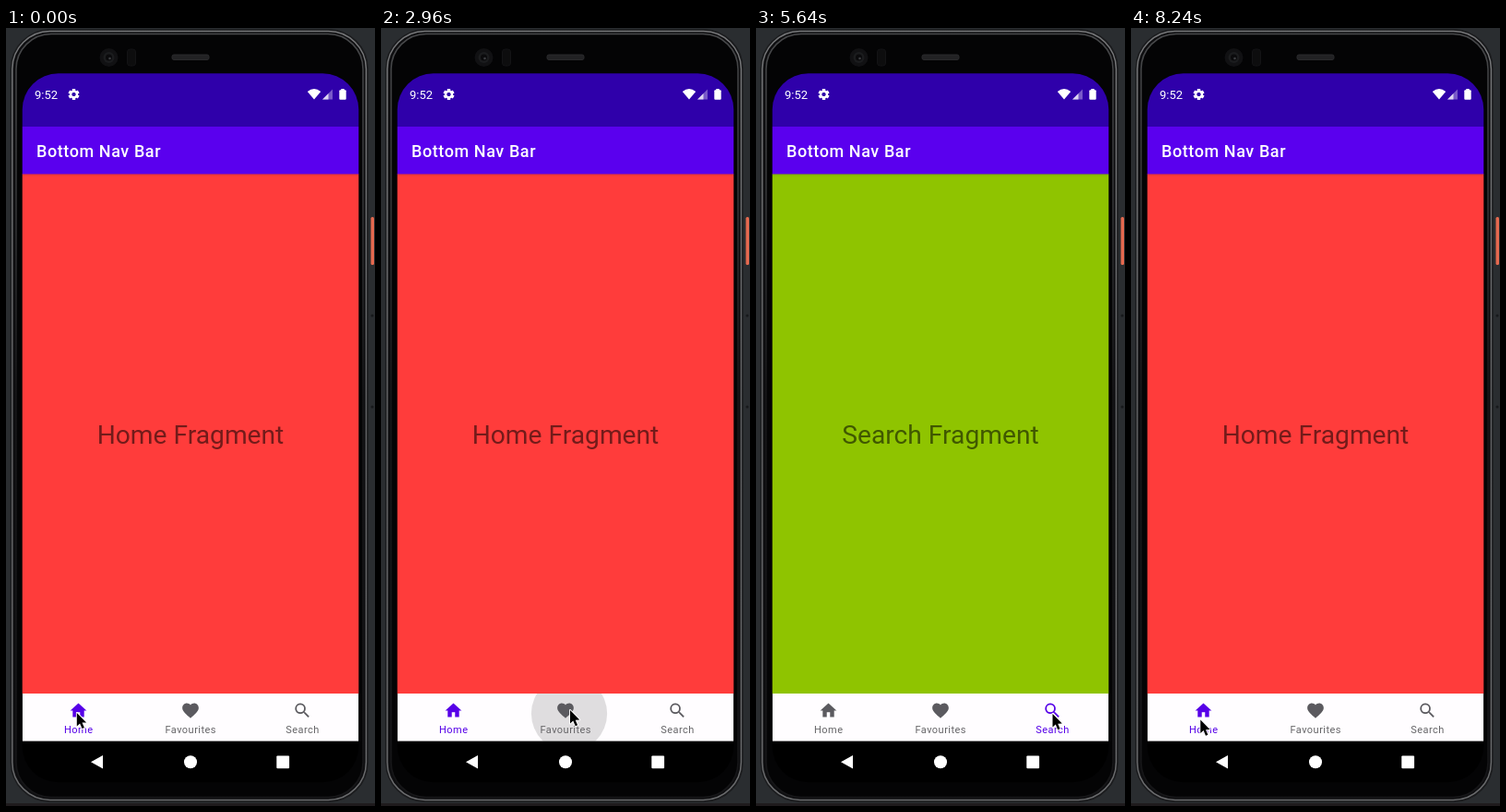
These frames come from a looping animation (400x844 px, 8.28 s). An HTML page with a canvas:

```html
<!DOCTYPE html>
<html lang="en">
<head>
<meta charset="utf-8">
<title>Bottom navigation</title>
<style>
  html, body { margin: 0; width: 100%; height: 100%; overflow: hidden; background: #2a2d30; }
  canvas { display: block; width: 400px; height: 844px; }
</style>
</head>
<body>
<canvas id="stage"></canvas>
<script>
const W = 400, H = 844, LOOP = 8280;
const canvas = document.getElementById('stage');
const ctx = canvas.getContext('2d');
const dpr = window.devicePixelRatio || 1;
canvas.width = W * dpr;
canvas.height = H * dpr;

const ACCENT = '#5600e8', MUTED = '#5b5a5f';
const FONT = 'Roboto, "Noto Sans", sans-serif';
const NAV = { x: 17.7, y: 722, w: 364.6, h: 51.6 };

const items = [
  { label: 'Home', x: 78.5, color: '#ff3c3b',
    icon: 'M10 20v-6h4v6h5v-8h3L12 3 2 12h3v8z' },
  { label: 'Favourites', x: 200, color: '#2da9e1',
    icon: 'M12 21.35l-1.45-1.32C5.4 15.36 2 12.28 2 8.5 2 5.42 4.42 3 7.5 3c1.74 0 3.41.81 4.5 2.09C13.09 3.81 14.76 3 16.5 3 19.58 3 22 5.42 22 8.5c0 3.78-3.4 6.86-8.55 11.54z' },
  { label: 'Search', x: 321.3, color: '#8fc400',
    icon: 'M15.5 14h-.79l-.28-.27A6.5 6.5 0 1 0 13.73 14.43l.27.28v.79l5 4.99L20.49 19zM9.5 14a4.5 4.5 0 1 1 0-9 4.5 4.5 0 0 1 0 9z' }
];
for (const it of items) it.path = new Path2D(it.icon);

const switches = [[0, 0], [3000, 1], [5120, 2], [7080, 0]];
const taps = [
  { t: 930, item: 0, x: 76, y: 743 },
  { t: 2863, item: 1, x: 204.8, y: 743 },
  { t: 4965, item: 2, x: 320.5, y: 747 },
  { t: 6928, item: 0, x: 74.5, y: 751.5 }
];
const moves = [
  { a: 1900, b: 2560, from: [76.3, 742.4], to: [204.5, 739.5] },
  { a: 4150, b: 4750, from: [204.5, 739.5], to: [321, 743.5] },
  { a: 6100, b: 6750, from: [321, 743.5], to: [74.8, 750] }
];

const clamp = v => Math.max(0, Math.min(1, v));
const mix = (a, b, k) => a + (b - a) * k;
const smooth = k => k * k * (3 - 2 * k);

// cubic-bezier(.4, 0, .2, 1)
function fastOutSlowIn(x) {
  let lo = 0, hi = 1;
  for (let i = 0; i < 20; i++) {
    const s = (lo + hi) / 2, r = 1 - s;
    if (1.2 * r * r * s + 0.6 * r * s * s + s * s * s < x) lo = s; else hi = s;
  }
  return 3 * (1 - lo) * lo * lo + lo ** 3;
}

function rect(x, y, w, h, fill) {
  ctx.fillStyle = fill;
  ctx.fillRect(x, y, w, h);
}

function round(x, y, w, h, r, fill, stroke, line = 1) {
  ctx.beginPath();
  ctx.roundRect(x, y, w, h, r);
  if (fill) { ctx.fillStyle = fill; ctx.fill(); }
  if (stroke) { ctx.strokeStyle = stroke; ctx.lineWidth = line; ctx.stroke(); }
}

function disc(x, y, r, fill) {
  ctx.beginPath();
  ctx.arc(x, y, r, 0, Math.PI * 2);
  ctx.fillStyle = fill;
  ctx.fill();
}

function poly(points, fill) {
  ctx.beginPath();
  points.forEach(([x, y]) => ctx.lineTo(x, y));
  ctx.closePath();
  ctx.fillStyle = fill;
  ctx.fill();
}

function text(str, x, y, size, fill, { align = 'left', weight = 400, gap = 0 } = {}) {
  ctx.font = `${weight} ${size}px ${FONT}`;
  ctx.letterSpacing = gap + 'px';
  ctx.textAlign = align;
  ctx.fillStyle = fill;
  ctx.fillText(str, x, y);
  ctx.letterSpacing = '0px';
}

function vertical(y0, y1, ...stops) {
  const g = ctx.createLinearGradient(0, y0, 0, y1);
  stops.forEach((c, i) => g.addColorStop(i / (stops.length - 1), c));
  return g;
}

function drawPhone() {
  rect(0, 0, W, H, '#2a2d30');
  rect(0, 841, W, 3, '#1f1b1d');
  round(395.5, 205, 3.5, 52, 1.5, '#e5694f');
  disc(397, 312, 1.5, '#17191b');
  disc(397, 411, 1.5, '#17191b');

  // metal rim, brightest near the top
  round(5.5, 2, 386.5, 837, 42, '#161618', '#1b1c1e', 1.5);
  round(6.8, 3.4, 383.6, 834, 41, '#0e0e10', vertical(0, H, '#77787a', '#606163', '#6a6b6d'), 1.5);
  round(11, 6.5, 376, 828, 38, '#040405', vertical(0, 400, '#48494b', '#343537', '#161618'), 1.5);

  disc(111.5, 32, 10, '#111113');
  disc(111.5, 32, 6, '#1b1c1e');
  disc(111.5, 32, 3.5, '#0a0a0c');
  disc(112.5, 33, 1.3, '#3c3e41');
  round(131.5, 23, 9, 18, 3, '#0d0d0e', '#131315');
  round(180, 29, 40, 5.5, 2, '#222224', '#2a2a2c');
}

function drawGear(x, y) {
  ctx.save();
  ctx.translate(x, y);
  for (let i = 0; i < 6; i++) {
    rect(-1.7, -6, 3.4, 3.5, '#fff');
    ctx.rotate(Math.PI / 3);
  }
  ctx.beginPath();
  ctx.arc(0, 0, 3.3, 0, Math.PI * 2);
  ctx.strokeStyle = '#fff';
  ctx.lineWidth = 2.6;
  ctx.stroke();
  disc(0, 0, 2, '#2f00aa');
  ctx.restore();
}

function drawStatus() {
  rect(17, 49, 366, 58, '#2f00aa');
  text('9:52', 31, 77, 13, '#fff');
  drawGear(73.5, 72);

  ctx.beginPath();
  ctx.moveTo(334, 77.5);
  ctx.lineTo(326.8, 69);
  ctx.quadraticCurveTo(334, 63, 341.2, 69);
  ctx.closePath();
  ctx.fillStyle = '#fff';
  ctx.fill();

  poly([[343, 77.5], [354, 66.5], [354, 77.5]], 'rgba(255,255,255,.35)');
  poly([[343, 77.5], [349.5, 71], [349.5, 77.5]], 'rgba(255,255,255,.75)');
  rect(363.3, 66, 3.4, 2, '#fff');
  round(361.3, 67.2, 7.4, 10.6, 1, '#fff');
}

function drawRipple(t, active) {
  ctx.save();
  ctx.beginPath();
  ctx.rect(NAV.x, NAV.y, NAV.w, NAV.h);
  ctx.clip();
  for (const tap of taps) {
    const age = t - tap.t;
    if (age < 0 || age > 650) continue;
    const grow = fastOutSlowIn(clamp(age / 450));
    const alpha = clamp(age / 75) * (1 - clamp((age - 450) / 200));
    const selected = active === tap.item;
    ctx.globalAlpha = alpha * (selected ? 0.18 : 0.125);
    disc(mix(tap.x, items[tap.item].x, grow), mix(tap.y, 748, grow),
      mix(36.3, 66, grow), selected ? '#6200ee' : '#000');
  }
  ctx.restore();
}

function drawItem(it, on) {
  const color = on ? ACCENT : MUTED;
  const s = 0.885;
  ctx.save();
  ctx.translate(it.x - 12 * s, 740.5 - 12 * s);
  ctx.scale(s, s);
  ctx.fillStyle = color;
  ctx.fill(it.path, 'evenodd');
  ctx.restore();
  text(it.label, it.x + 0.2, 764.5, 11, on ? ACCENT : '#666568', { align: 'center', gap: 0.47 });
}

function drawScreen(t) {
  let active = 0;
  for (const [at, i] of switches) if (t >= at) active = i;
  const page = items[active];

  ctx.save();
  ctx.beginPath();
  ctx.roundRect(17.7, 49.3, 364.6, 769, 39);
  ctx.clip();
  rect(17, 49, 366, 770, '#000');
  drawStatus();
  rect(17, 107, 366, 52, '#5a00ee');
  text('Bottom Nav Bar', 33, 140, 18, '#fff', { weight: 500, gap: 0.58 });

  rect(17, 158.5, 366, 563.5, page.color);
  rect(17, 158.5, 366, 3, vertical(158.5, 161.5, 'rgba(0,0,0,.1)', 'rgba(0,0,0,0)'));
  text(page.label + ' Fragment', 200, 451, 28.2, 'rgba(0,0,0,.55)', { align: 'center' });

  rect(NAV.x, NAV.y, NAV.w, NAV.h, '#fffdff');
  drawRipple(t, active);
  items.forEach((it, i) => drawItem(it, i === active));

  poly([[92, 796.3], [105, 789], [105, 803.6]], '#fff');
  disc(200, 796.3, 7, '#fff');
  round(293.3, 789.6, 13.8, 13.6, 1, '#fff');
  ctx.restore();
}

function drawCursor(t) {
  let [x, y] = moves[0].from;
  for (const m of moves) {
    if (t < m.a) break;
    const k = smooth(clamp((t - m.a) / (m.b - m.a)));
    x = mix(m.from[0], m.to[0], k);
    y = mix(m.from[1], m.to[1], k);
  }
  ctx.save();
  ctx.translate(x, y);
  ctx.lineJoin = 'round';
  ctx.lineWidth = 1.8;
  ctx.strokeStyle = '#fff';
  ctx.beginPath();
  const arrow = [[0.5, 0.5], [0.5, 15], [3.8, 12], [6.2, 17.7], [8.6, 16.7], [6.2, 11.2], [10.8, 11]];
  arrow.forEach(([px, py]) => ctx.lineTo(px, py));
  ctx.closePath();
  ctx.stroke();
  ctx.fillStyle = '#000';
  ctx.fill();
  ctx.restore();
}

let start = null;
function frame(now) {
  if (start === null) start = now;
  const t = (now - start) % LOOP;
  ctx.setTransform(dpr, 0, 0, dpr, 0, 0);
  drawPhone();
  drawScreen(t);
  drawCursor(t);
  requestAnimationFrame(frame);
}
requestAnimationFrame(frame);
</script>
</body>
</html>
```
